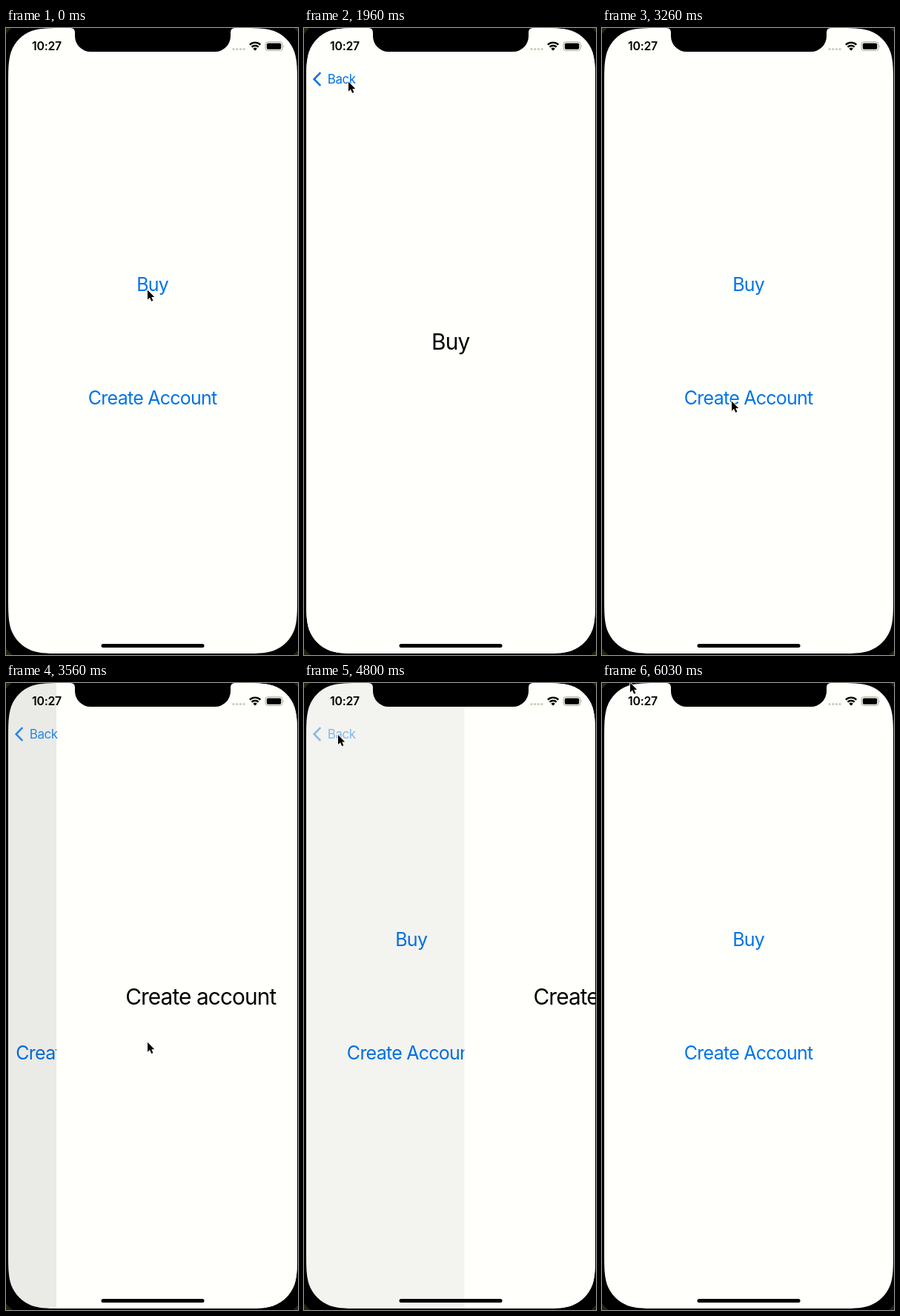
An HTML page for the animation above (6060 ms loop, 394 px wide and 846 px high).

```html
<!DOCTYPE html>
<html lang="en">
<head>
<meta charset="utf-8">
<title>Navigation demo</title>
<style>
  html, body { margin: 0; width: 100%; height: 100%; overflow: hidden; background: #000; }
  svg { display: block; width: 100vw; height: 100vh; }
  text { font-family: Inter, Roboto, sans-serif; letter-spacing: -.03em; }
  .mid { text-anchor: middle; }
  .link { fill: #0073ea; font-size: 25px; }
  .title { font-size: 29.8px; }
  .back { fill: #0073ea; font-size: 17px; }
  .clock { font-size: 15.8px; font-weight: 600; letter-spacing: -.015em; }
  .paper { fill: #fffffb; }
</style>
</head>
<body>
<svg viewBox="0 0 394 846">
  <defs>
    <clipPath id="screen"><path id="outline"/></clipPath>
  </defs>
  <rect width="394" height="846" fill="#25230f"/>
  <rect x="-14" y="-16" width="424" height="877" rx="64"/>

  <g clip-path="url(#screen)">
    <rect class="paper" width="394" height="846"/>
    <g id="home">
      <text class="link mid" x="197.7" y="354.5">Buy</text>
      <text class="link mid" x="197.7" y="508">Create Account</text>
    </g>
    <rect id="dim" width="394" height="846"/>
    <g id="page">
      <rect class="paper" x="3" width="390" height="846"/>
      <text id="title" class="title mid" x="197.7" y="433.5"></text>
    </g>
    <g id="nav">
      <path d="M22.3 60.2 13.6 69l8.7 8.8" fill="none" stroke="#0073ea" stroke-width="2.5"/>
      <text class="back" x="31.8" y="75">Back</text>
    </g>
    <rect x="128.5" y="831" width="139" height="5" rx="2.5"/>
  </g>

  <path d="M87 0Q93 0 93 6V11A21 21 0 0 0 114 32H282A21 21 0 0 0 303 11V6Q303 0 309 0Z"/>
  <text class="clock mid" x="55" y="30.3">10:27</text>
  <g fill="#c9c8b4">
    <circle cx="307" cy="28.5" r="1.6"/><circle cx="311.7" cy="28.5" r="1.6"/>
    <circle cx="316.4" cy="28.5" r="1.6"/><circle cx="321" cy="28.5" r="1.6"/>
  </g>
  <g fill="none" stroke="#000" stroke-width="2.3">
    <path d="M328.9 22.6a10.3 10.3 0 0 1 14.4 0M331.5 25.6a6.6 6.6 0 0 1 9.2 0"/>
  </g>
  <path d="M336.1 30.6 333.4 27.9a3.9 3.9 0 0 1 5.4 0Z"/>
  <rect x="350" y="18.8" width="23" height="11.6" rx="3.4" fill="none" stroke="#a5a493"/>
  <rect x="351.8" y="20.5" width="19.4" height="8.2" rx="1.8"/>
  <path d="M374.4 22.8q1.5 1.8 0 3.6Z" fill="#a5a493"/>

  <path id="cursor" d="M1 1.5V14.6L4 11.8 6.2 16.7 8.4 15.7 6.3 11H10.2Z"
        stroke="#fff" stroke-width="1.6" paint-order="stroke"/>
</svg>
<script>
const LOOP = 6060, WIDTH = 390, PARALLAX = 0.3, RATE = 0.014;
const SCREEN = { left: 3, top: 0, right: 393, bottom: 844, radius: 51 };

const transitions = [
  { at: 200, to: 1, title: "Buy" },
  { at: 2050, to: 0, title: "Buy" },
  { at: 3330, to: 1, title: "Create account" },
  { at: 4670, to: 0, title: "Create account" }
];

// Pointer stops: time, x, y
const pointer = [
  [0, 190, 352], [400, 190, 352], [660, 192, 352], [900, 192, 352],
  [1800, 59, 71], [2400, 59, 71], [3050, 174, 502], [3450, 174, 502],
  [3860, 263, 398], [4500, 46, 69], [5100, 44, 68], [5500, 44, 68], [6030, 37, -2]
];

const el = id => document.getElementById(id);
const home = el("home"), dim = el("dim"), page = el("page");
const title = el("title"), nav = el("nav"), cursor = el("cursor");
const move = (node, x, y = 0) => node.setAttribute("transform", `translate(${x} ${y})`);

// Rectangle whose corners ease gradually into the straight sides
function smoothRect({ left, top, right, bottom, radius }) {
  const half = [[0, 1.53], [0, 1.09], [0, 0.87], [0.075, 0.63], [0.17, 0.37]];
  const corner = half.concat(half.map(([a, b]) => [b, a]).reverse());
  const place = (x, y, sx, sy, points) =>
    points.map(([a, b]) => [x + sx * radius * a, y + sy * radius * b]);
  const reversed = [...corner].reverse();
  const corners = [
    place(left, top, 1, 1, corner), place(right, top, -1, 1, reversed),
    place(right, bottom, -1, -1, corner), place(left, bottom, 1, -1, reversed)
  ];
  return "M" + corners.map(([first, ...rest]) => `${first}C${rest.join(" ")}`).join("L") + "Z";
}

// Critically damped spring, from 0 to 1
const spring = ms => 1 - (1 + RATE * ms) * Math.exp(-RATE * ms);

function pointerAt(t) {
  const next = pointer.findIndex(stop => stop[0] > t);
  if (next < 0) return pointer[pointer.length - 1].slice(1);
  const [t0, x0, y0] = pointer[next - 1], [t1, x1, y1] = pointer[next];
  const u = (t - t0) / (t1 - t0), k = u * u * (3 - 2 * u);
  return [x0 + (x1 - x0) * k, y0 + (y1 - y0) * k];
}

function render(t) {
  const step = transitions.filter(s => s.at <= t).pop();
  const done = step ? spring(t - step.at) : 0;
  const shown = step && step.to ? done : step ? 1 - done : 0;
  move(home, -PARALLAX * WIDTH * shown);
  move(page, WIDTH * (1 - shown));
  dim.setAttribute("opacity", 0.1 * shown);
  nav.setAttribute("opacity", shown < 0.03 ? 0 : shown);
  title.textContent = step ? step.title : "";
  move(cursor, ...pointerAt(t));
}

el("outline").setAttribute("d", smoothRect(SCREEN));
const start = performance.now();
function tick() {
  render((performance.now() - start) % LOOP);
  requestAnimationFrame(tick);
}
tick();
</script>
</body>
</html>
```
